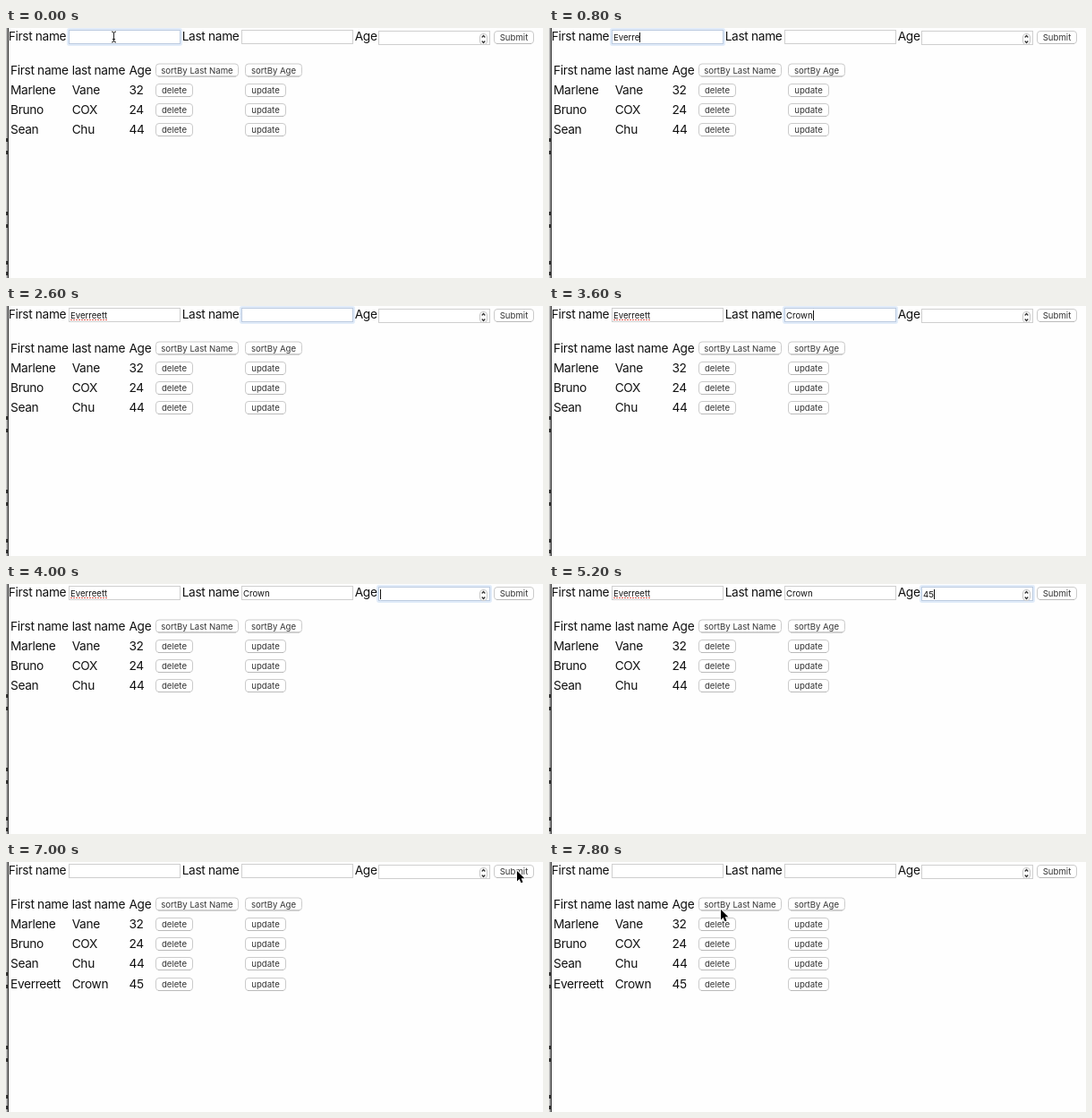
Animation of 600x279 px, one loop 8000 ms. Source, as an HTML page with a canvas:

```html
<!DOCTYPE html>
<html lang="en">
<head>
<meta charset="utf-8">
<title>People form</title>
<style>
  html, body { margin: 0; width: 100%; height: 100%; overflow: hidden; background: #fefefe; }
  canvas { display: block; width: 600px; height: 279px; }
</style>
</head>
<body>
<canvas id="stage" width="600" height="279"></canvas>
<script>
const ctx = document.getElementById('stage').getContext('2d');
const LOOP = 8000, STEP = 200;
const BODY = '13.7px Inter, Roboto, sans-serif';
const SMALL = '9.6px Inter, Roboto, sans-serif';
const FIRST = 'Everreett', LAST = 'Crown', AGE = '45';
const PEOPLE = [['Marlene', 'Vane', '32'], ['Bruno', 'COX', '24'], ['Sean', 'Chu', '44']];
const FIELDS = { first: [70, 2], last: [263, 2], age: [416, 3] };
const FIELD_WIDTH = 125;
const COLUMNS = [5, 73.7, 137.5];

// Pointer stops: time, x, y
const ARROW_PATH = [
  [5800, 249, 12], [6000, 500, 37], [6200, 591, 35], [6400, 590, 34],
  [6600, 579, 20], [6800, 571, 10], [7000, 571, 10], [7200, 545, 19],
  [7400, 420, 41], [7600, 255, 56], [7800, 192, 53]
];

function text(value, x, y, font = BODY, color = '#111') {
  ctx.font = font;
  ctx.letterSpacing = font === BODY ? '-0.33px' : '0px';
  ctx.fillStyle = color;
  ctx.fillText(value, x, y);
}

function rounded(x, y, w, h, r) {
  ctx.beginPath();
  ctx.roundRect(x, y, w, h, r);
}

function button(label, x, y, w) {
  rounded(x + .5, y - 6.5, w - 1, 14, 3.5);
  ctx.fillStyle = '#fff';
  ctx.fill();
  ctx.strokeStyle = '#cbcbcb';
  ctx.lineWidth = 1;
  ctx.stroke();
  ctx.fillStyle = '#bababa';
  ctx.fillRect(x + 3, y + 7, w - 6, 1);
  ctx.textAlign = 'center';
  text(label, x + w / 2, y + 4, SMALL, '#333');
  ctx.textAlign = 'left';
}

function spinner() {
  rounded(529.5, 6.5, 8, 12, 3.5);
  ctx.fillStyle = '#fff';
  ctx.fill();
  ctx.strokeStyle = '#c8c8c8';
  ctx.lineWidth = 1;
  ctx.stroke();
  ctx.strokeStyle = '#333';
  ctx.lineWidth = 1.2;
  ctx.beginPath();
  for (const dir of [-1, 1]) {
    ctx.moveTo(531.7, 12.5 + dir * 2);
    ctx.lineTo(533.5, 12.5 + dir * 4);
    ctx.lineTo(535.3, 12.5 + dir * 2);
  }
  ctx.stroke();
}

function field([x, y], value, focused, caret) {
  ctx.fillStyle = '#fff';
  ctx.fillRect(x, y, FIELD_WIDTH, 16);
  if (focused) {
    ctx.strokeStyle = 'rgba(160, 192, 235, .32)';
    ctx.lineWidth = 3;
    rounded(x - .5, y - .5, FIELD_WIDTH + 1, 17, 1.5);
    ctx.stroke();
  }
  ctx.strokeStyle = focused ? '#bccbe0' : '#cfcfcf';
  ctx.lineWidth = 1;
  ctx.strokeRect(x + .5, y + .5, FIELD_WIDTH - 1, 15);
  text(value, x + 2, y + 12, SMALL);
  if (caret) {
    const end = Math.round(x + 2 + ctx.measureText(value).width);
    ctx.fillStyle = '#111';
    ctx.fillRect(end, y + 3, 1, 11);
  }
}

function spellMark(value) {
  ctx.font = SMALL;
  ctx.letterSpacing = '0px';
  const width = ctx.measureText(value).width;
  ctx.fillStyle = '#e2574c';
  for (let x = 0; x < width; x += 3) ctx.fillRect(72 + x, 15, 2, 1);
}

function cells(values, baseline) {
  values.forEach((value, i) => text(value, COLUMNS[i], baseline));
}

function row(person, y) {
  cells(person, y + 5);
  button('delete', 167, y, 42);
  button('update', 267, y, 46);
}

function windowEdge() {
  ['#bbb', '#999', '#333'].forEach((color, x) => {
    ctx.fillStyle = color;
    ctx.fillRect(x, 0, 1, 279);
  });
  ctx.fillStyle = '#333';
  for (const y of [123, 137, 205, 219, 260, 272]) ctx.fillRect(0, y, 2, 4);
}

function ibeam(x, y) {
  ctx.strokeStyle = '#222';
  ctx.lineWidth = 1;
  ctx.beginPath();
  ctx.moveTo(x - 2.5, y - 6);
  ctx.quadraticCurveTo(x, y - 6, x, y - 4);
  ctx.lineTo(x, y + 4);
  ctx.quadraticCurveTo(x, y + 6, x - 2.5, y + 6);
  ctx.moveTo(x + 2.5, y - 6);
  ctx.quadraticCurveTo(x, y - 6, x, y - 4);
  ctx.moveTo(x, y + 4);
  ctx.quadraticCurveTo(x, y + 6, x + 2.5, y + 6);
  ctx.moveTo(x - 1.5, y + 2.5);
  ctx.lineTo(x + 1.5, y + 2.5);
  ctx.stroke();
}

function arrow(x, y) {
  ctx.save();
  ctx.translate(x, y);
  ctx.beginPath();
  ctx.moveTo(0, 0);
  for (const [px, py] of [[0, 11.5], [2.6, 9], [4.5, 13.3], [6.5, 12.4], [4.7, 8.3], [8.3, 8.3]]) {
    ctx.lineTo(px, py);
  }
  ctx.closePath();
  ctx.strokeStyle = '#fff';
  ctx.lineWidth = 1.6;
  ctx.stroke();
  ctx.fillStyle = '#000';
  ctx.fill();
  ctx.restore();
}

function firstTyped(t) {
  if (t < 1200) return FIRST.slice(0, Math.min(6, Math.max(0, (t - 200) / STEP * 2)));
  return FIRST.slice(0, 7 + (t - 1200) / STEP);
}

function draw(t) {
  const sent = t >= 7000;
  const focus = sent ? '' : t < 2000 ? 'first' : t < 4000 ? 'last' : 'age';
  const values = {
    first: sent ? '' : firstTyped(t),
    last: sent ? '' : LAST.slice(0, Math.max(0, (t - 2600) / STEP)),
    age: sent ? '' : AGE.slice(0, Math.max(0, (t - 4800) / STEP))
  };
  const caretOn = t >= 200 && t !== 2600 && !(t >= 4600 && t < 5000);

  ctx.fillStyle = '#fefefe';
  ctx.fillRect(0, 0, 600, 279);
  windowEdge();

  text('First name', 2.7, 14);
  text('Last name', 196.7, 14);
  text('Age', 389.7, 14);
  for (const name in FIELDS) {
    field(FIELDS[name], values[name], focus === name, focus === name && caretOn);
  }
  spinner();
  if (t >= 2600 && !sent) spellMark(values.first);
  button('Submit', 545, 10, 45);

  cells(['First name', 'last name', 'Age'], 52);
  button('sortBy Last Name', 167, 46.5, 93);
  button('sortBy Age', 267, 46.5, 64);
  const people = sent ? [...PEOPLE, [FIRST, LAST, AGE]] : PEOPLE;
  people.forEach((person, i) => row(person, Math.floor(69 + i * 22.4)));

  if (t < 200) ibeam(120.5, 10);
  else if (t < 400) ibeam(194.5, 10);
  const stop = ARROW_PATH.findLast(([time]) => time <= t);
  if (stop) arrow(stop[1], stop[2]);
}

const start = performance.now();
function tick() {
  const t = (performance.now() - start) % LOOP;
  draw(Math.floor(t / STEP) * STEP);
  requestAnimationFrame(tick);
}
tick();
</script>
</body>
</html>
```
